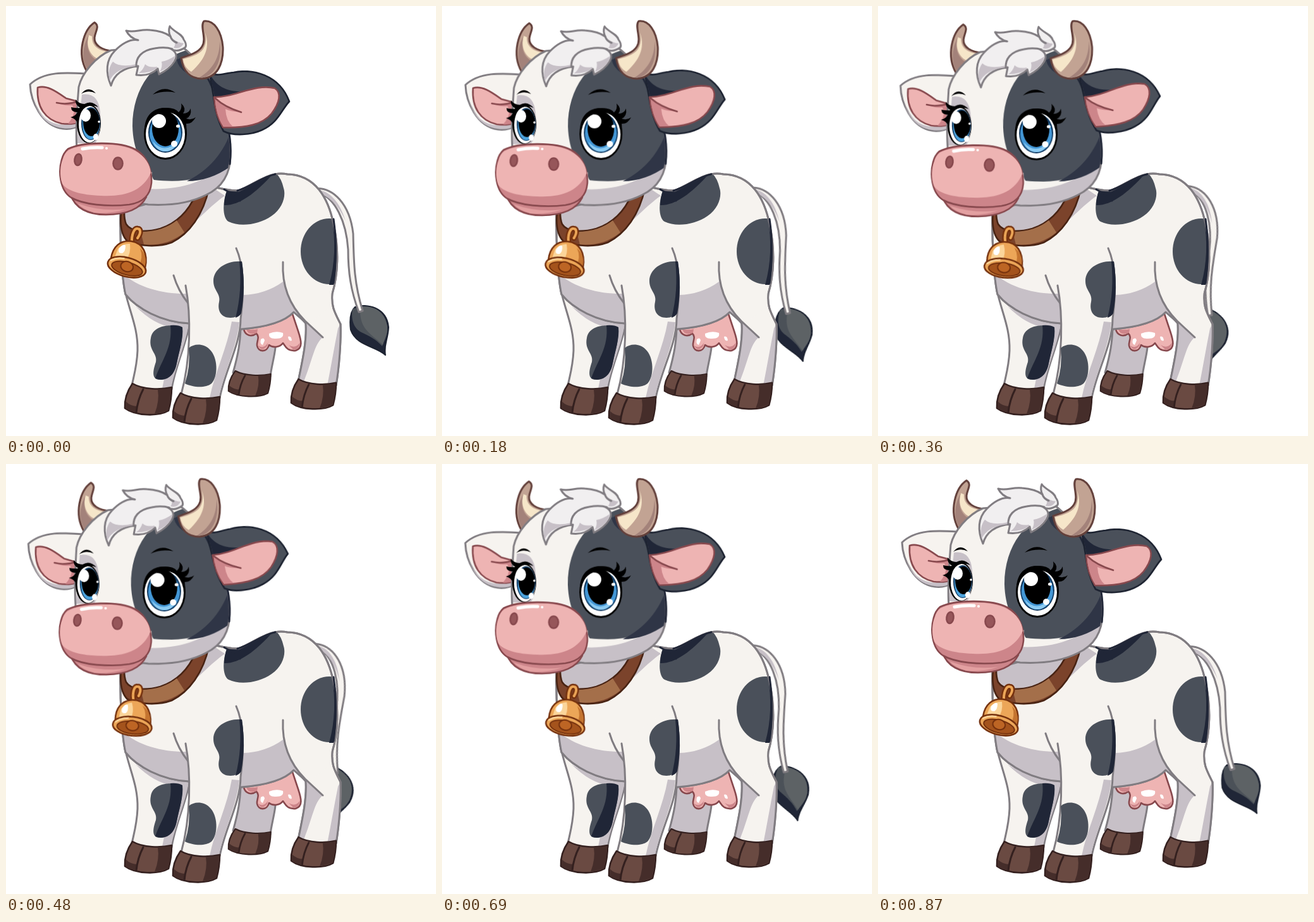
An HTML page without scripts for the animation above (0.9 s loop, 680 by 680 pixels).

```html
<!DOCTYPE html>
<html lang="en">
<head>
<meta charset="utf-8">
<title>Swaying calf</title>
<style>
html, body { margin: 0; width: 100%; height: 100%; overflow: hidden; background: #fff; }
svg { display: block; width: 100vw; height: 100vh; }
path, ellipse { stroke-linejoin: round; stroke-linecap: round; }

.coat { fill: #f6f3ef; }
.shade { fill: #c7c0c7; }
.line { stroke: #807c81; stroke-width: 3; }
.crease { fill: none; }
.spot { fill: #4a505a; }
.dark { fill: #202637; }
.pink { fill: #eeb4b3; }
.rose { fill: #cd858a; }
.rim { stroke: #87484d; stroke-width: 2.6; }
.horn { fill: #c2a393; stroke: #63403b; stroke-width: 3; }
.cream { fill: #f6e6c9; }
.brass { fill: #eca658; stroke: #74300d; stroke-width: 2.6; }
.shine { fill: #fff; }

/* Every moving part sways between rest and --turn. */
.sway {
  transform-origin: var(--pivot);
  animation: sway 450ms cubic-bezier(.37, 0, .63, 1) infinite alternate;
}
.tail { --pivot: 510px 297px; --turn: 12deg; }
.tuft { --pivot: 561px 482px; --turn: 23deg; }
.bell { --pivot: 207px 355px; --turn: -8.5deg; }
.head { --pivot: 310px 300px; --turn: -1.2deg; }
.ear-left { --pivot: 115px 145px; --turn: 2.6deg; }
.ear-right { --pivot: 335px 130px; --turn: -3.2deg; }
@keyframes sway { to { transform: rotate(var(--turn)); } }
</style>
</head>
<body>
<svg viewBox="0 0 680 680">
  <defs>
    <path id="torso" d="M181 325C180 370 183 430 189 456C207 478 245 500 290 502L372 511C410 508 440 500 455 484C464 492 470 496 474 502C476 530 468 565 462 594Q490 606 522 600C527 570 530 530 529 503C520 485 514 475 516 455C525 425 527 385 518 345C510 305 490 267 445 266Q435 264 425 266C405 270 388 284 368 292C350 292 335 288 322 284Z"/>
    <path id="skull" d="M112 225C110 200 112 165 115 128C120 106 142 80 166 70L275 62C300 80 322 105 330 140C342 165 356 190 355 235C355 265 342 287 316 299C290 312 260 316 225 314L130 300Z"/>
    <clipPath id="in-torso"><use href="#torso"/></clipPath>
    <clipPath id="in-skull"><use href="#skull"/></clipPath>
    <g id="hoof">
      <path fill="#6a4a42" stroke="#34201f" stroke-width="2.6" d="M13 0C30 10 58 10 75 6C75 20 73 32 70 43C55 52 18 52 1 39C0 24 6 10 13 0Z"/>
      <path fill="#452d2a" d="M53 9L74 8C74 20 72 32 69 42Q62 46 48 48Q56 28 53 9ZM2 28Q10 36 21 36L20 46Q8 44 2 39Z"/>
      <path fill="none" stroke="#34201f" stroke-width="3" d="M30 9Q21 26 19 46"/>
    </g>
  </defs>

  <g class="sway tail">
    <g class="sway tuft">
      <path class="dark" stroke="#1c2230" stroke-width="2" d="M552 476C570 470 602 476 605 508C604 528 597 536 600 552C586 538 554 538 545 512C543 495 545 482 552 476Z"/>
      <path fill="#4b5158" d="M548 479C545 495 550 510 562 516C575 522 585 527 595 538C597 530 604 522 603 507C598 478 572 472 548 479Z"/>
      <path fill="#5d6265" d="M562 475C585 474 600 485 603 507C604 520 598 527 596 536C580 520 562 514 560 486Z"/>
    </g>
    <path class="coat line" d="M485 289C518 284 544 315 549 360C550 410 551 440 564 482L558 484C545 450 541 420 541 385C538 340 520 303 495 296Z"/>
    <path class="shade" d="M492 291C512 292 528 310 537 340C528 320 515 304 500 298Z"/>
  </g>

  <!-- far legs and udder -->
  <path class="shade line" d="M371 495C372 530 366 555 359 580Q388 592 418 586C420 565 429 545 427 510Z"/>
  <use href="#hoof" transform="translate(351 577) scale(.9 .82)"/>
  <path class="pink rim" d="M376 511C378 521 388 524 396 518C402 524 396 530 397 537C399 548 413 548 416 536C422 541 433 540 438 533C442 538 444 546 458 545C470 541 467 529 462 514L452 484L420 500Z"/>
  <path class="rose" d="M380 511Q388 513 398 511L397 517Q383 522 380 511ZM399 537Q407 543 414 533L416 525 413 538Q404 548 399 537ZM447 536Q458 543 465 532Q463 545 454 543Z"/>
  <path class="shine" d="M416 518Q427 513 438 517Q440 526 427 526Q415 527 416 518ZM403 527Q408 523 409 529L406 536Q401 535 403 527ZM446 523Q451 521 452 529Q447 531 446 523Z"/>
  <path class="coat line" d="M188 450C196 485 209 510 208 545C207 570 202 585 199 600Q230 611 262 606C266 575 285 535 291 500L230 470Z"/>
  <path class="shade" d="M205 475Q240 497 289 503C284 535 268 570 261 604L247 605C254 570 262 535 264 508Q235 505 205 475Z"/>
  <path class="spot" d="M278 508C264 503 233 503 229 525C225 545 240 549 237 563C231 580 231 592 245 591C260 590 267 580 270 565C274 545 281 525 278 508Z"/>
  <path class="dark" d="M260 505Q272 504 279 508C281 525 274 545 270 565C267 580 260 590 245 591L236 589C246 560 264 540 260 505Z"/>

  <use href="#hoof" transform="translate(187 597)"/>

  <!-- body -->
  <use href="#torso" class="coat line"/>
  <g clip-path="url(#in-torso)">
    <path class="shade" d="M184 423C210 446 250 456 288 455L375 457Q410 456 438 436L460 486Q430 512 372 511L290 502Q215 495 186 455Z"/>
    <path class="shade" d="M181 322L322 284 346 300C320 318 292 352 254 377L200 372 181 352Z"/>
    <path class="coat" d="M438 405C436 445 450 475 480 502L520 470 500 400Z"/>
    <path class="shade" d="M438 432C446 470 470 497 501 524C487 535 485 560 470 596L460 594 475 502 455 486C445 470 438 452 438 432ZM525 510C519 540 514 570 508 600L530 602V500ZM492 283C508 300 516 330 519 350L530 345 505 286Z"/>
    <ellipse class="spot" cx="511" cy="388" rx="45" ry="52"/>
    <path class="dark" d="M515 334Q525 390 511 441H530V334Z"/>
    <path class="spot" d="M350 290C342 310 342 335 352 341C370 350 400 346 420 332C438 320 443 300 439 288Q434 266 420 260L365 285Z"/>
    <path class="dark" d="M345 315C368 316 396 296 425 262L365 285 350 290Q345 303 345 315Z"/>
  </g>
  <use href="#torso" class="crease line"/>
  <path class="crease" stroke="#202637" stroke-width="3" d="M345 290Q359 297 370 308M366 292C388 286 405 270 426 266M518 337Q525 385 518 438"/>
  <path class="crease line" d="M438 405C436 445 450 475 473 498L501 524M265 426Q272 450 288 470"/>
  <use href="#hoof" transform="translate(450 590) scale(.96)"/>

  <!-- near front leg -->
  <path class="coat line" d="M284 442C293 490 292 560 277 614Q305 626 338 620C345 580 371 535 371 495C377 450 376 410 364 383"/>
  <path class="shade" d="M369 500C366 535 345 580 337 618L322 620C330 580 350 540 357 499Z"/>
  <path class="spot" d="M373 404C350 402 328 415 328 435C328 450 340 455 337 468C334 482 340 493 355 493Q366 493 371 486C377 460 377 430 373 404Z"/>
  <path class="dark" d="M369 404Q374 450 363 493Q369 491 372 486C377 460 377 430 373 404Z"/>
  <path class="spot" d="M289 541C297 534 312 533 322 543C335 555 336 585 325 597C315 605 295 603 283 597Q292 570 289 541Z"/>
  <use href="#hoof" transform="translate(263 612)"/>

  <!-- collar and bell -->
  <path fill="#7b432b" stroke="#482313" stroke-width="2.6" d="M182 326C180 345 182 362 192 372C210 380 240 382 262 374C290 360 312 330 321 288L300 298C288 326 268 344 244 352C222 358 198 358 190 345Q187 338 187 326Z"/>
  <path fill="#a46f4a" d="M213 357C238 357 256 350 270 339L282 358C262 375 238 379 218 377Z"/>
  <g class="sway bell">
    <path fill="none" stroke="#74300d" stroke-width="9" d="M199 376C198 361 203 351 208 352C214 353 213 360 208 367"/>
    <path fill="none" stroke="#eca658" stroke-width="4" d="M199 376C198 361 203 351 208 352C214 353 213 360 208 367"/>
    <path class="brass" d="M166 399C169 380 181 370 198 372C217 375 225 392 220 414Q192 420 166 399Z"/>
    <path fill="#c47430" d="M212 383C221 392 223 402 219 414L209 413Q218 398 212 383Z"/>
    <path fill="#fbd59a" d="M177 384Q185 375 196 376Q198 390 190 402L172 397Z"/>
    <path class="shine" d="M179 383Q186 375 189 379Q189 388 184 391Q176 392 179 383Z"/>
    <g transform="rotate(15 191 413)">
      <ellipse class="brass" cx="191" cy="413" rx="31" ry="15"/>
      <ellipse fill="#a4531c" stroke="#74300d" stroke-width="2" cx="192" cy="415" rx="25" ry="10"/>
      <ellipse fill="#bd6524" stroke="#74300d" stroke-width="2" cx="191" cy="412" rx="10" ry="8"/>
      <path fill="none" stroke="#fbd59a" stroke-width="2.5" d="M164 409Q172 402 183 401"/>
    </g>
  </g>

  <g class="sway head">
    <g class="sway ear-left">
      <path class="coat line" d="M125 107C95 105 60 103 38 124C39 150 56 190 90 194Q105 196 118 188Z"/>
      <path class="shade" d="M43 146Q55 187 92 188L116 183V189Q104 195 90 193C62 190 49 168 43 146Z"/>
      <path class="pink rim" d="M50 129C65 124 82 137 95 146L118 152V183Q105 188 88 186C62 180 48 160 50 129Z"/>
      <path class="rose" d="M80 153Q98 157 118 150V183Q108 187 98 186Q112 170 105 157Q90 158 80 153Z"/>
      <path class="crease rim" d="M80 153Q97 157 116 150"/>
    </g>

    <path class="horn" d="M140 26C122 38 112 75 127 102C140 100 155 86 169 71C152 70 139 62 140 50C141 40 149 32 140 26Z"/>
    <path class="cream" d="M131 46C126 62 132 78 146 84L163 73C148 71 135 64 136 48Z"/>
    <path fill="#a3827a" d="M131 46C120 65 120 85 128 99L144 86C130 79 126 62 131 46Z"/>

    <use href="#skull" class="coat"/>
    <g clip-path="url(#in-skull)">
      <path class="shade" d="M222 289C270 292 315 280 352 248L360 280 300 320H180ZM120 140Q146 136 149 168Q152 202 141 217H112Z"/>
      <path class="spot" d="M285 70C235 85 200 128 200 190C201 225 212 250 231 263Q230 271 234 275C270 279 310 277 350 255L365 200 340 100Z"/>
      <path fill="#2f3546" d="M358 190C348 228 322 260 286 277Q325 277 360 250ZM284 78L270 85Q275 110 318 116L300 90Z"/>
    </g>
    <use href="#skull" class="crease line"/>
    <path class="crease" stroke="#202637" stroke-width="3" d="M340 165C355 190 357 225 354 250M318 112Q328 130 332 148"/>

    <g class="sway ear-right">
      <path class="spot" stroke="#1c2230" stroke-width="2.6" d="M322 106C335 112 345 106 360 105C390 99 432 108 448 151C435 165 430 185 405 196C388 204 360 206 344 198C334 180 330 160 328 142Z"/>
      <path class="dark" d="M323 108C332 127 350 137 380 135C360 144 345 146 330 144Z"/>
      <path class="pink rim" d="M329 144C360 145 395 122 425 130C436 137 433 153 420 170C405 188 380 193 343 192C333 176 330 160 329 144Z"/>
      <path class="rose" d="M331 146Q343 158 372 168Q355 167 347 163Q348 182 359 191H344C335 178 331 160 331 146Z"/>
      <path class="crease rim" d="M331 146Q346 160 372 168"/>
    </g>

    <path class="horn" d="M313 24C329 22 341 40 343 65C344 92 334 113 310 115C292 115 280 104 277 82C290 78 304 74 310 64C318 52 306 32 313 24Z"/>
    <path class="cream" d="M315 42C322 62 318 82 293 104C286 100 281 93 280 84C295 80 309 76 314 64Q318 54 315 42Z"/>
    <path fill="#a3827a" d="M338 56C342 78 335 108 312 113L306 113C328 100 338 80 338 56Z"/>

    <path class="line" fill="#f1eff0" d="M166 126C157 105 158 85 172 71C185 58 198 52 209 54Q196 51 190 39C204 43 212 36 228 38C242 39 252 42 260 48Q256 40 259 32C265 41 278 43 281 53Q286 60 284 65C276 71 268 72 261 68C280 78 262 98 242 108L240 99C232 107 222 111 206 109L209 95C190 97 172 104 166 126Z"/>
    <path class="shade" d="M164 118C161 106 163 96 169 88Q180 98 206 92L206 95C188 97 172 102 164 118ZM210 106Q217 101 220 92Q226 98 239 96L239 98Q230 106 210 106ZM243 104Q248 96 246 88Q257 86 267 79Q266 94 243 104ZM264 52Q272 58 281 59Q276 69 265 66Q270 60 264 52Z"/>
    <path class="crease line" d="M206 96C205 82 214 70 235 67Q252 64 263 68M260 48Q262 55 270 58" stroke-width="2.5"/>

    <!-- eyes -->
    <ellipse cx="131" cy="186" rx="19" ry="31"/>
    <ellipse class="shine" cx="132" cy="187" rx="17" ry="29"/>
    <ellipse fill="#123b63" cx="134" cy="186" rx="15" ry="26"/>
    <ellipse fill="#4ba3de" cx="134" cy="188" rx="13" ry="23"/>
    <ellipse cx="135" cy="184" rx="13" ry="22"/>
    <ellipse class="shine" cx="126" cy="173" rx="8" ry="10"/>
    <ellipse class="shine" cx="142" cy="207" rx="4" ry="5"/>
    <circle class="shine" cx="147" cy="183" r="1.8"/>
    <path d="M113 185Q110 178 102 176Q110 174 113 168Q103 168 103 160Q111 162 117 161Q109 156 110 148Q116 155 124 155Q136 148 146 160Q133 154 122 163Q115 172 113 185Z"/>
    <path d="M119 139Q130 125 142 138Q130 132 119 139Z"/>

    <ellipse cx="252" cy="202" rx="34" ry="41"/>
    <ellipse class="shine" cx="252" cy="203" rx="31" ry="37"/>
    <ellipse fill="#123b63" cx="252" cy="200" rx="27" ry="32"/>
    <ellipse fill="#4397d6" cx="252" cy="201" rx="25" ry="29"/>
    <path fill="#8ccbf2" d="M232 214Q251 236 272 213Q266 230 252 230Q238 230 232 214Z"/>
    <ellipse cx="252" cy="194" rx="21" ry="28"/>
    <circle class="shine" cx="242" cy="182" r="11"/>
    <circle class="shine" cx="266" cy="218" r="5"/>
    <ellipse class="shine" cx="272" cy="190" rx="3" ry="2.5"/>
    <path d="M219 195C220 170 236 160 254 161Q268 161 273 168Q279 163 277 154Q286 162 280 170Q289 170 292 162Q294 174 285 178Q293 181 300 176Q294 187 285 186L286 205C282 180 270 167 251 168Q229 170 219 195Z"/>
    <path d="M232 140Q249 124 268 137Q250 133 232 140Z"/>

    <!-- muzzle -->
    <path class="rose rim" d="M102 298C109 320 130 330 158 330C188 330 212 322 222 302Z"/>
    <path fill="#e3a0a1" d="M113 312Q150 326 190 321Q165 329 140 327Q122 322 113 312Z"/>
    <path class="rose rim" d="M98 226C120 215 180 213 205 227C225 238 231 262 230 280C228 301 215 311 195 314C160 318 122 314 103 303C84 291 83 260 88 243Q91 232 98 226Z"/>
    <path class="pink" d="M99 228C120 217 180 215 204 229C220 238 228 250 229 264C216 292 190 302 150 300C118 299 96 292 89 281C84 268 86 250 90 242Q92 233 99 228Z"/>
    <path fill="none" stroke="#fff" stroke-width="5" d="M121 226Q137 223 152 224"/>
    <circle class="shine" cx="159" cy="225" r="2"/>
    <ellipse class="rim" fill="#96565a" cx="114" cy="243" rx="5.5" ry="9" transform="rotate(8 114 243)"/>
    <ellipse class="rim" fill="#96565a" cx="177" cy="249" rx="7.5" ry="9.5"/>
  </g>
</svg>
</body>
</html>
```
